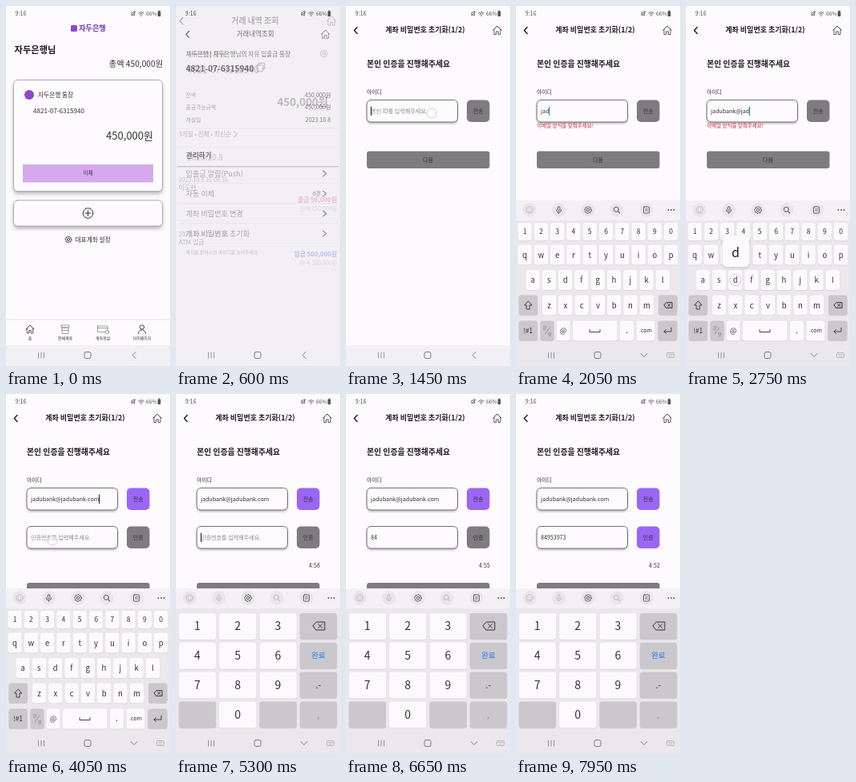
An HTML page with a canvas that plays this animation: 205 by 450 pixels, repeating every 8 s.

```html
<!DOCTYPE html>
<html lang="ko">
<head>
<meta charset="utf-8">
<title>계좌 비밀번호 초기화</title>
<style>
  html, body { margin: 0; width: 100%; height: 100%; overflow: hidden; background: #fdfbfe; }
  canvas { display: block; width: 205px; height: 450px; }
</style>
</head>
<body>
<canvas id="stage"></canvas>
<script>
const W = 205, H = 450, LOOP = 8000;
const canvas = document.getElementById('stage');
const ratio = Math.max(1, window.devicePixelRatio || 1);
canvas.width = W * ratio;
canvas.height = H * ratio;
const c = canvas.getContext('2d');

const FONT = '"Noto Sans CJK KR", "Noto Sans CJK", "Noto Sans", sans-serif';
const INK = '#343136', BLACK = '#1d1a1f', SOFT = '#77747a';
const PAGE = '#fdfbfe', BAR = '#f3f0f5', DISABLED = '#807b80';
const PURPLE = '#9b66f4', LILAC = '#d6a9ee', BOARD = '#eae8ed', KEY = '#fcfafd', DARK_KEY = '#cac8cc';
const BANK = '자두은행', ACCOUNT = '4821-07-6315940';
const HANDLE = 'jadubank@jadubank';

// timeline, ms
const KEY_START = 1810, KEY_STEP = 83, KEY_HOLD = 75, DOT_COM = 3220;
const SENT = 3750, REFOCUS = 4100, PAD_AT = 4200, TICK = 475;
const CODE = '84953973';
const CODE_AT = [6180, 6400, 6900, 7060, 7230, 7400, 7580, 7740];
const TAPS = [[1430, 1540, 107, 134], [3540, 3640, 165, 131], [4010, 4110, 58, 183]];

const clamp = v => Math.max(0, Math.min(1, v));

function text(s, x, y, size, color = INK, align = 'left', weight = 400) {
  c.font = `${weight} ${size}px ${FONT}`;
  c.fillStyle = color;
  c.textAlign = align;
  c.textBaseline = 'middle';
  c.fillText(s, x, y);
}

function box(x, y, w, h, r, fill, stroke, lw = 1) {
  c.beginPath();
  c.roundRect(x, y, w, h, r);
  if (fill) { c.fillStyle = fill; c.fill(); }
  if (stroke) { c.strokeStyle = stroke; c.lineWidth = lw; c.stroke(); }
}

function shadowed(draw, alpha, blur, dy) {
  c.save();
  c.shadowColor = `rgba(0,0,0,${alpha})`;
  c.shadowBlur = blur * ratio;
  c.shadowOffsetY = dy * ratio;
  draw();
  c.restore();
}

// bordered panel whose shadow falls below it
function panel(x, y, w, h, border, alpha, blur, dy) {
  shadowed(() => box(x, y, w, h, 5, PAGE), alpha, blur, dy);
  box(x, y, w, h, 5, null, border, .9);
}

function line(points, color = INK, lw = 1, close = false) {
  c.beginPath();
  for (let i = 0; i < points.length; i += 2) c.lineTo(points[i], points[i + 1]);
  if (close) c.closePath();
  c.strokeStyle = color;
  c.lineWidth = lw;
  c.lineCap = c.lineJoin = 'round';
  c.stroke();
}

function ring(x, y, r, color = INK, lw = 1, from = 0, to = Math.PI * 2) {
  c.beginPath();
  c.arc(x, y, r, from, to);
  c.strokeStyle = color;
  c.lineWidth = lw;
  c.stroke();
}

function disc(x, y, r, color) {
  c.beginPath();
  c.arc(x, y, r, 0, Math.PI * 2);
  c.fillStyle = color;
  c.fill();
}

const rule = (y, color = '#dcd9de', lw = .8) => line([0, y, W, y], color, lw);
const next = (x, y, color = SOFT) => line([x - 2, y - 3.5, x + 2, y, x - 2, y + 3.5], color, 1.1);

function gear(x, y, r, color) {
  ring(x, y, r * .38, color, .9);
  const pts = [];
  for (let i = 0; i < 32; i++) {
    const a = i * Math.PI / 16, q = i % 4 < 2 ? r : r * .8;
    pts.push(x + Math.cos(a) * q, y + Math.sin(a) * q);
  }
  line(pts, color, .9, true);
}

function house(x, y, r) {
  line([x - r, y, x, y - r, x + r, y], INK, .9);
  line([x - r * .75, y - r * .2, x - r * .75, y + r, x - r * .25, y + r, x - r * .25, y + r * .3,
    x + r * .25, y + r * .3, x + r * .25, y + r, x + r * .75, y + r, x + r * .75, y - r * .2], INK, .8);
}

function header(title, size = 9, weight = 700) {
  line([14, 26.5, 10.3, 30.5, 14, 34.5], BLACK, 1.4);
  text(title, 99, 30, size, BLACK, 'center', weight);
  house(189, 30.3, 5.3);
}

function homePage() {
  box(81, 24, 8, 8, 1.5, '#8a4bc4');
  text(BANK, 91, 28, 9.2, '#6b3bb0', 'left', 700);
  text(BANK + '님', 10.5, 55, 11.3, BLACK, 'left', 700);
  text('총액 450,000원', 196, 72, 10.2, INK, 'right');
  panel(9.5, 92.5, 186, 139, '#a9a6ac', .3, 5, 3);
  disc(29, 111, 6, '#8a4bc4');
  text(BANK + ' 통장', 40, 111, 7.7);
  text(ACCOUNT, 34, 131, 8.1);
  text('450,000원', 184, 162, 13, INK, 'right');
  box(21, 198, 163, 22.5, 0, LILAC);
  text('이체', 102.5, 209, 6.5, INK, 'center');
  panel(9.5, 243, 186, 32, '#a9a6ac', .3, 5, 3);
  ring(102.5, 259, 6.3);
  line([99, 259, 106, 259]);
  line([102.5, 255.5, 102.5, 262.5]);
  gear(78, 292, 4, INK);
  text('대표계좌 설정', 86.5, 292, 7.7);

  rule(392, '#e2dfe4');
  house(30, 404, 5);
  box(69, 399, 10, 3, .5, null, SOFT, .7);
  box(70, 402, 8, 7.5, .5, null, SOFT, .7);
  line([70, 405.5, 78, 405.5], SOFT, .7);
  box(114.5, 400, 12.5, 7.5, .5, null, SOFT, .7);
  line([114.5, 402.5, 127, 402.5], SOFT, .7);
  disc(126.5, 407.5, 2.6, PAGE);
  ring(126.5, 407.5, 2.2, SOFT, .8);
  ring(170, 401.5, 2.7, INK, .9);
  ring(170, 409.5, 4.6, INK, .9, Math.PI, Math.PI * 2);
  ['홈', '전체계좌', '계좌개설', '마이페이지'].forEach((s, i) =>
    text(s, [30, 74, 121, 170][i], 415, 4.9, INK, 'center'));
}

function entry(y, who, label, sum, rest, color) {
  text('2023.10.8 16:08:35', 9, y, 6.8, '#555');
  text(who, 9, y + 9, 7.5);
  text(`${label} ${sum}원`, 195.5, y + 23, 7.4, color, 'right', 700);
  text(`잔액 ${rest}원`, 195.5, y + 34, 6.6, '#999', 'right');
}

function historyPage() {
  header('거래 내역 조회', 9.3);
  text(BANK + ' 통장', 19, 69, 8);
  text(ACCOUNT, 19, 88, 10.7);
  gear(180, 69, 4.3, '#777');
  text('450,000원', 185, 126, 12.5, INK, 'right', 700);
  text('3개월 • 전체 • 최신순', 9, 164, 7.2);
  next(76, 164);
  rule(179);
  text('2023.10.8', 19, 191, 9.5, '#555');
  rule(203, '#bbb');
  entry(218, '이도현', '출금', '50,000', '450,000', '#d23b45');
  rule(266);
  entry(282, 'ATM 입금', '입금', '500,000', '500,000', '#3b49d2');
  rule(329);
}

function managePage() {
  header('거래내역조회', 8.8, 400);
  text(`${BANK} | ${BANK}님의 자유 입출금 통장`, 10, 56, 7.9);
  text(ACCOUNT, 10, 74, 10.4, BLACK, 'left', 700);
  box(101, 70, 8, 8, 1, null, SOFT, .8);
  line([103, 70, 103, 67.5, 111, 67.5, 111, 75, 109, 75], SOFT, .8);
  [['잔액', '450,000원'], ['출금가능금액', '450,000원'], ['개설일', '2023.10.8']].forEach(([k, v], i) => {
    text(k, 10, 108 + i * 16, 7, SOFT);
    text(v, 196, 108 + i * 16, 7.4, INK, 'right');
  });
  rule(151);
  text('관리하기', 10.5, 186, 8.8, BLACK, 'left', 700);
  rule(200, '#98959a', 1);
  ['입출금 알림(Push)', '자동 이체', '계좌 비밀번호 변경', '계좌 비밀번호 초기화'].forEach((s, i) => {
    const y = 209 + i * 25.7;
    text(s, 10, y, 9.4, SOFT);
    next(188, y, INK);
    rule(y + 12.5);
  });
  text('0건', 183, 234.7, 7, INK, 'right');
  text('해지를 원하시면 아이디를 눌러주세요.', 10, 310, 6, '#a09da2');
}

function field(y, value, hint) {
  panel(26, y, 113.5, 27.5, '#67646a', .28, 3, 2);
  if (value) text(value, 31, y + 14, 7.1);
  else text(hint, 31, y + 14, 7.1, '#8c898f');
}

function button(y, label, on) {
  box(151, y, 28.5, 27.5, 5, on ? PURPLE : DISABLED);
  text(label, 165.3, y + 14, 7, INK, 'center');
}

function caret(value, y, since, color) {
  if (since % 400 >= 200) return;
  c.font = `400 7.1px ${FONT}`;
  const x = 31.3 + c.measureText(value).width;
  line([x, y + 8.5, x, y + 19], color, 1.1);
}

function resetPage(t) {
  const typed = Math.max(0, Math.min(HANDLE.length, Math.floor((t - KEY_START) / KEY_STEP) + 1));
  const mail = t < KEY_START ? '' : HANDLE.slice(0, typed) + (t >= DOT_COM ? '.com' : '');
  const digits = CODE_AT.filter(at => t >= at).length;
  const code = CODE.slice(0, digits);
  const sent = t >= SENT;

  header('계좌 비밀번호 초기화(1/2)');
  text('본인 인증을 진행해주세요', 26, 72, 9.85, BLACK, 'left', 700);
  text('아이디', 26, 107, 6.8);
  field(117.5, mail, '본인 ID를 입력해주세요.');
  button(117.5, '전송', t >= DOT_COM);
  if (mail && t < DOT_COM) text('이메일 양식을 맞춰주세요!', 26, 150, 6.5, '#c9303a');

  if (sent) {
    field(165.5, code, '인증번호를 입력해주세요.');
    button(165.5, '인증', digits === CODE.length);
  }
  if (t >= REFOCUS + 50) {
    const left = 300 - Math.floor((t - REFOCUS) / TICK);
    const sec = String(left % 60).padStart(2, '0');
    text(`${Math.floor(left / 60)}:${sec}`, 180, 214, 7.2, INK, 'right');
  }
  const y = sent ? 236 : 181.5;
  box(26, y, 153.5, 21.5, 3, DISABLED);
  text('다음', 102.5, y + 10.5, 7, INK, 'center');

  if (t >= REFOCUS) {
    const last = digits ? CODE_AT[digits - 1] : REFOCUS;
    caret(code, 165.5, t - last, BLACK);
  } else if (t >= 1430) {
    const last = t >= DOT_COM ? DOT_COM : mail ? KEY_START + (typed - 1) * KEY_STEP : 1430;
    caret(mail, 117.5, t - last, mail && t < DOT_COM ? '#12a08c' : BLACK);
  }
}

// letter rows: characters, first centre x, centre y
const ROWS = [['1234567890', 11, 282], ['qwertyuiop', 11, 311], ['asdfghjkl', 21, 342.5], ['zxcvbnm', 41.5, 374]];
const keyAt = {};
for (const [chars, x0, y] of ROWS)
  [...chars].forEach((k, i) => keyAt[k] = [x0 + i * 20.3, y]);
keyAt['@'] = [59, 406];

function cap(x, y, w, h, fill = KEY) {
  shadowed(() => box(x, y, w, h, 3, fill), .12, 1, .5);
}

function eraser(x, y, s) {
  line([x - 6 * s, y, x - 2.5 * s, y - 4 * s, x + 6 * s, y - 4 * s, x + 6 * s, y + 4 * s, x - 2.5 * s, y + 4 * s], INK, 1, true);
  line([x - .5 * s, y - 2 * s, x + 3.5 * s, y + 2 * s], INK, .9);
  line([x - .5 * s, y + 2 * s, x + 3.5 * s, y - 2 * s], INK, .9);
}

function toolbar(pad) {
  box(0, 243, W, 25, 0, '#f3f1f5');
  const y = 255, dim = '#bbb8be', ink = '#545157', fade = pad ? dim : ink;
  [17, 53.5, 90, 126, 163].forEach(x => disc(x, y, 8.5, '#e8e6eb'));
  ring(17, y, 4.2, dim, .9);
  ring(17, y + .5, 2.2, dim, .8, .2, Math.PI - .2);
  disc(15.5, y - 1.2, .6, dim);
  disc(18.5, y - 1.2, .6, dim);
  box(52.2, y - 4.3, 2.6, 5.2, 1.3, null, fade, .9);
  ring(53.5, y - .3, 3.2, fade, .9, 0, Math.PI);
  line([53.5, y + 3, 53.5, y + 4.5], fade, .9);
  gear(90, y, 4.4, ink);
  ring(125.3, y - .7, 3, fade, 1);
  line([127.6, y + 1.6, 129.8, y + 3.8], fade, 1.1);
  box(159.5, y - 4, 7, 8, 1, null, ink, .9);
  line([161.5, y - 1.2, 164.5, y - 1.2], ink, .8);
  line([161.5, y + 1, 164.5, y + 1], ink, .8);
  [190.5, 194, 197.5].forEach(x => disc(x, y, .9, ink));
}

function letters(t) {
  for (const [chars, , row] of ROWS) {
    for (const k of chars) {
      const [x, y] = keyAt[k], h = row === 282 ? 22 : 25;
      cap(x - 8.7, y - h / 2, 17.4, h);
      text(k, x, y, row === 282 ? 8.5 : 9.5, INK, 'center');
    }
  }
  cap(3.5, 361.5, 23.5, 25, DARK_KEY);
  line([15, 369, 10.5, 374, 13, 374, 13, 379, 17, 379, 17, 374, 19.5, 374], INK, .9, true);
  cap(178, 361.5, 23.5, 25, DARK_KEY);
  eraser(190, 374, .85);
  cap(3.5, 393.5, 23.5, 25, DARK_KEY);
  text('!#1', 15, 406, 8.5, INK, 'center');
  cap(30.5, 393.5, 17, 25, DARK_KEY);
  text('한', 36, 402.5, 5, SOFT, 'center');
  text('영', 42, 410, 5, SOFT, 'center');
  line([36, 410, 42, 402], SOFT, .6);
  cap(50.5, 393.5, 17, 25);
  text('@', 59, 406, 9, INK, 'center');
  cap(71, 393.5, 55.5, 25);
  line([92, 404.5, 92, 407.5, 105, 407.5, 105, 404.5], INK, .9);
  cap(130, 393.5, 17, 25);
  text('.', 138.5, 405, 11, INK, 'center');
  const dot = t >= DOT_COM && t < DOT_COM + 90;
  cap(150.5, 393.5, 23, 25, dot ? DARK_KEY : KEY);
  text('.com', 162, 405.5, 7, INK, 'center');
  cap(177.5, 393.5, 24, 25, DARK_KEY);
  line([194, 402, 194, 407, 185, 407], INK, .9);
  line([187.5, 404.5, 185, 407, 187.5, 409.5], INK, .9);
  if (dot) ring(162, 406, 7, '#aaa8ae', .8);

  const i = Math.floor((t - KEY_START) / KEY_STEP);
  if (t >= KEY_START && i < HANDLE.length && t - KEY_START - i * KEY_STEP < KEY_HOLD) {
    const k = HANDLE[i], [x, y] = keyAt[k];
    const left = Math.max(2, Math.min(W - 35, x - 15.8));
    ring(x, y, 7, '#c2c0c5', .8);
    shadowed(() => box(left, y - 56, 33, 39.5, 5, KEY), .16, 4, 1);
    text(k, left + 16.2, y - 35, 16, BLACK, 'center');
  }
}

function numberPad(t) {
  const down = CODE_AT.findIndex(at => t >= at && t < at + 100);
  const keys = ['1', '2', '3', '', '4', '5', '6', '완료', '7', '8', '9', '.-', '', '0', '', ','];
  keys.forEach((k, i) => {
    const x = 3.7 + i % 4 * 50.4, y = 274 + Math.floor(i / 4) * 36.8;
    const digit = k !== '' && k >= '0' && k <= '9';
    const hit = digit && k === CODE[down];
    cap(x, y, 46.3, 33, !digit ? DARK_KEY : hit ? '#dedde2' : KEY);
    if (i === 3) eraser(x + 23.5, y + 16, 1.25);
    const color = k === '완료' ? '#2878e8' : k === ',' ? '#96949a' : INK;
    if (k) text(k, x + 23, y + 16, digit ? 14 : k === '완료' ? 9.5 : 11, color, 'center');
    if (hit) ring(x + 23, y + 17, 7, '#aaa8ae', .8);
  });
}

function keyboard(t) {
  const rise = 1 - Math.pow(1 - clamp((t - 1470) / 170), 2);
  if (rise <= 0) return;
  c.save();
  c.beginPath();
  c.rect(0, 0, W, 424);
  c.clip();
  c.translate(0, (1 - rise) * 181);
  box(0, 243, W, 190, 0, BOARD);
  const pad = t >= PAD_AT;
  toolbar(pad);
  if (pad) numberPad(t); else letters(t);
  c.restore();
}

function systemBars(t) {
  const open = t >= 1490, ink = '#7d7a80', gray = '#555258';
  text('9:16', 11.5, 9.5, 7.2, gray);
  line([157, 8, 158.5, 8, 160.5, 6.5, 160.5, 12, 158.5, 10.8, 157, 10.8], gray, .8, true);
  line([157, 12, 162, 7], gray, .8);
  ring(169, 12.2, 4.6, gray, .9, -2.4, -.74);
  ring(169, 12.2, 2.6, gray, .9, -2.4, -.74);
  disc(169, 12, .8, gray);
  text('66%', 175, 9.5, 6.8, gray);
  box(189.7, 6.5, 3.6, 6.5, .8, gray);
  box(190.6, 5.5, 1.8, 1.2, 0, gray);

  box(0, 424, W, 26, 0, open ? BOARD : BAR);
  [40.5, 44, 47.5].forEach(x => line([x, 433, x, 440], ink, .8));
  box(98, 432.5, 8, 8, 2, null, ink, 1);
  if (open) {
    line([156, 434.5, 160, 438.5, 164, 434.5], ink, 1);
    box(188.5, 433.5, 9, 6, 1, null, '#a5a2a8', .7);
    line([190, 435.5, 196, 435.5], '#a5a2a8', .6);
    line([191, 437.7, 195, 437.7], '#a5a2a8', .6);
  } else {
    line([162, 432.5, 158, 436.5, 162, 440.5], ink, 1);
  }
}

const PAGES = [homePage, historyPage, managePage, resetPage];
const MOVES = [[80, 350], [460, 700], [960, 1200]];

function zoomed(page, t, scale, alpha) {
  c.save();
  c.globalAlpha = clamp(alpha);
  c.translate(W / 2, H / 2);
  c.scale(scale, scale);
  c.translate(-W / 2, -H / 2);
  page(t);
  c.restore();
}

function draw(t) {
  c.setTransform(ratio, 0, 0, ratio, 0, 0);
  box(0, 0, W, H, 0, PAGE);
  const i = MOVES.findIndex(([a, b]) => t > a && t < b);
  if (i >= 0) {
    const [a, b] = MOVES[i], p = (t - a) / (b - a), e = 1 - (1 - p) ** 2;
    c.globalAlpha = clamp(4 * p * (1 - p));
    box(0, 0, W, H, 0, BAR);
    c.globalAlpha = 1;
    zoomed(PAGES[i], t, 1 + .073 * e, 1 - 1.2 * p);
    zoomed(PAGES[i + 1], t, .85 + .15 * e, p);
  } else {
    PAGES[MOVES.filter(m => t >= m[1]).length](t);
  }
  keyboard(t);
  systemBars(t);
  for (const [a, b, x, y] of TAPS) {
    if (t < a || t >= b) continue;
    disc(x, y, 6, 'rgba(255,255,255,.45)');
    ring(x, y, 6, '#c2c0c5', .8);
  }
}

const start = performance.now();
function frame() {
  draw((performance.now() - start) % LOOP);
  requestAnimationFrame(frame);
}
frame();
</script>
</body>
</html>
```
